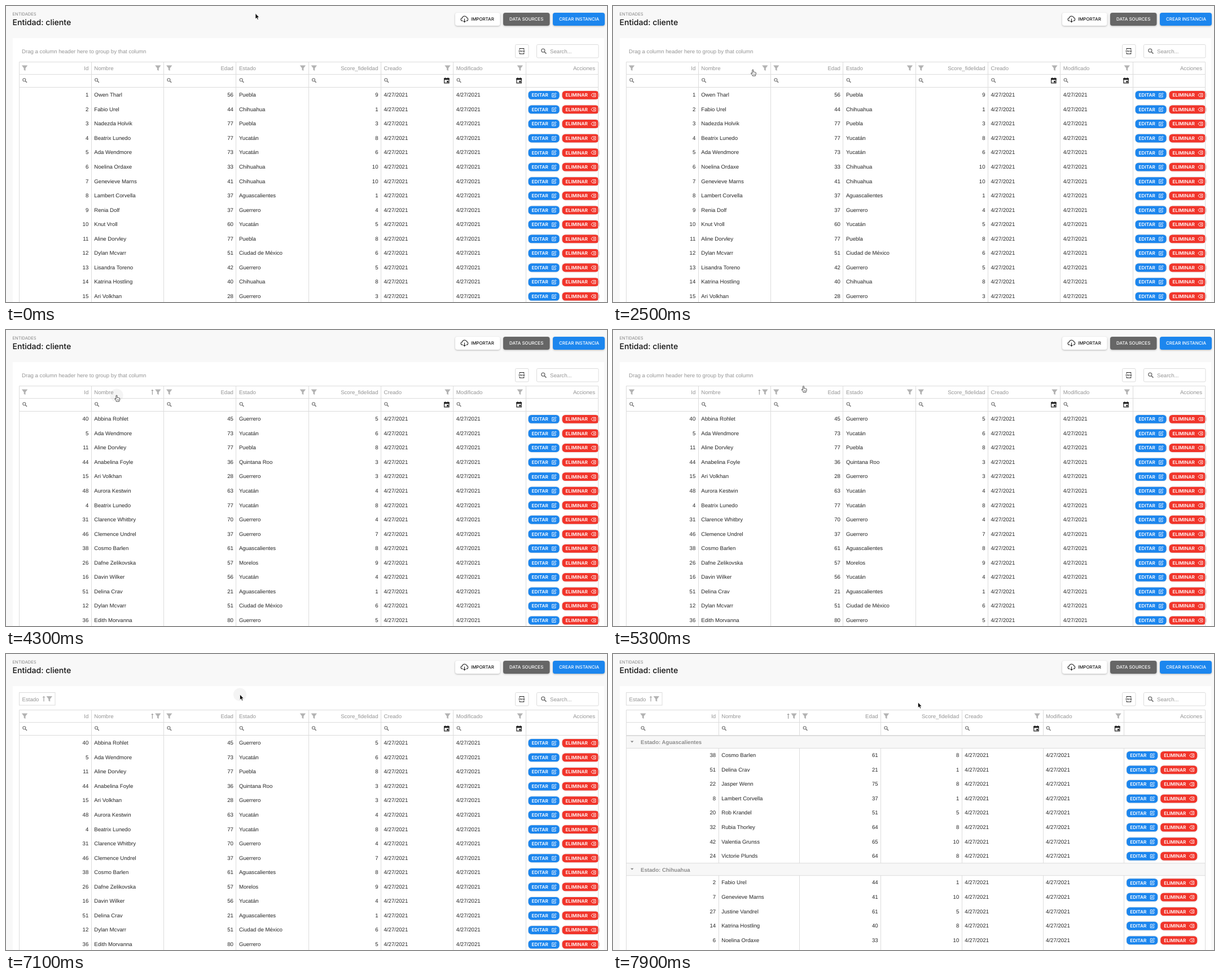
An HTML page that plays this animation: 1065 px wide and 526 px high, repeating every 8 s.

```html
<!DOCTYPE html>
<html lang="es">
<head>
<meta charset="utf-8">
<title>Entidad: cliente</title>
<style>
html, body { margin: 0; width: 100%; height: 100%; overflow: hidden; background: #f8f8f8; }
svg { display: block; width: 1065px; height: 526px; }
text { font: 9.65px "Liberation Sans", Arial, sans-serif; fill: #262626; text-rendering: geometricPrecision; white-space: pre; }
.r { text-anchor: end; }
.head { fill: #959595; }
.group { font-weight: bold; fill: #8d8d8d; }
.ui { font: 500 7.9px Inter, sans-serif; fill: #fff; }
.act { font: 600 8.2px Inter, sans-serif; fill: #fff; }
.line { stroke: #dcdcdc; fill: none; }
.box { stroke: #dcdcdc; fill: #fff; }
.lift { filter: drop-shadow(0 1px 1.5px #0004); }
.low { filter: drop-shadow(0 .7px .8px #0003); }
</style>
</head>
<body>
<svg id="stage" viewBox="0 0 1065 526"></svg>
<script>
const people = `1|Owen Tharl|56|Puebla|9
2|Fabio Urel|44|Chihuahua|1
3|Nadezda Holvik|77|Puebla|3
4|Beatrix Lunedo|77|Yucatán|8
5|Ada Wendmore|73|Yucatán|6
6|Noelina Ordaxe|33|Chihuahua|10
7|Genevieve Marns|41|Chihuahua|10
8|Lambert Corvella|37|Aguascalientes|1
9|Renia Dolf|37|Guerrero|4
10|Knut Vroll|60|Yucatán|5
11|Aline Dorvley|77|Puebla|8
12|Dylan Mcvarr|51|Ciudad de México|6
13|Lisandra Toreno|42|Guerrero|5
14|Katrina Hostling|40|Chihuahua|8
15|Ari Volkhan|28|Guerrero|3
16|Davin Wilker|56|Yucatán|4
20|Rob Krandel|51|Aguascalientes|5
22|Jasper Wenn|75|Aguascalientes|8
24|Victorie Plunds|64|Aguascalientes|8
26|Dafne Zelikovska|57|Morelos|9
27|Justine Vandrel|61|Chihuahua|5
31|Clarence Whitbry|70|Guerrero|4
32|Rubia Thorley|64|Aguascalientes|8
36|Edith Morvanna|80|Guerrero|5
38|Cosmo Barlen|61|Aguascalientes|8
40|Abbina Rohlet|45|Guerrero|5
42|Valentia Grunss|65|Aguascalientes|10
44|Anabelina Foyle|36|Quintana Roo|3
46|Clemence Undrel|37|Guerrero|7
48|Aurora Kestwin|63|Yucatán|4
51|Delina Crav|21|Aguascalientes|1`.split('\n').map(row => {
  const [Id, Nombre, Edad, Estado, Score_fidelidad] = row.split('|');
  return { Id, Nombre, Edad, Estado, Score_fidelidad, Creado: '4/27/2021', Modificado: '4/27/2021' };
});
const byName = [...people].sort((a, b) => a.Nombre < b.Nombre ? -1 : 1);
const numeric = ['Id', 'Edad', 'Score_fidelidad'];
const rowH = 25.55;

const text = (x, y, s, cls = '') => `<text x="${x}" y="${y}" class="${cls}">${s}</text>`;
const rect = (x, y, w, h, attrs) => `<rect x="${x}" y="${y}" width="${w}" height="${h}" ${attrs}/>`;
const icon = (id, x, y, attrs = '') => `<use href="#${id}" x="${x}" y="${y}" ${attrs}/>`;
const path = (d, attrs = 'class="line"') => `<path d="${d}" ${attrs}/>`;

function actions(x, y) {
  return `<g class="low">${rect(x, y - 7.3, 55, 14.8, 'rx="5.5" fill="#1c86ee"')}${rect(x + 60, y - 7.3, 65, 14.8, 'rx="5.5" fill="#f1352b"')}</g>`
    + text(x + 6, y + 3, 'EDITAR', 'act') + icon('edit', x + 45.5, y)
    + text(x + 66, y + 3, 'ELIMINAR', 'act') + icon('erase', x + 115.5, y);
}

// blocks: [{ title?, y, rows }], y is the top of the first data row
function grid(id, cols, left, pitch, blocks, sorted) {
  const edge = i => i ? 1049.4 - (cols.length + 1 - i) * pitch : left;
  let out = '';
  for (let i = 1; i <= cols.length; i++) out += path(`M${Math.floor(edge(i)) + .5} 99.5V526`);
  cols.forEach((name, i) => {
    const l = edge(i), r = edge(i + 1), num = numeric.includes(name);
    const place = (y, s, cls) => num ? text(r - 5, y, s, cls + ' r') : text(l + 5, y, s, cls);
    let col = place(114.4, name, 'head') + icon('funnel', num ? l + 9.6 : r - 10.3, 110.3);
    if (sorted && name == 'Nombre') col += icon('up', r - 20.3, 110.5);
    for (const b of blocks) b.rows.forEach((p, n) => col += place(b.y + 16.2 + n * rowH, p[name], ''));
    out += `<g class="col-${name}">${col}</g>` + icon('find', l + 9.8, 132.3);
    if (!num && /ado$/.test(name) && name != 'Estado') out += icon('date', r - 12, 132.5);
  });
  out += text(1044, 114.4, 'Acciones', 'head r');
  for (const b of blocks) {
    b.rows.forEach((p, n) => out += actions(edge(cols.length) + 4.5, b.y + 13.3 + n * rowH));
    if (b.title) out += rect(23.5, b.y - 21.5, 1026, 22, 'fill="#f7f7f7" stroke="#dcdcdc"')
      + text(49, b.y - 6.7, 'Estado: ' + b.title, 'group') + path(`M31 ${b.y - 12.5}h5.6l-2.8 3z`, 'fill="#888"');
  }
  return `<g id="${id}">${out}${path('M23.5 526V99.5H1049.5V526M23.5 121.5H1049.5M23.5 144.5H1049.5')}</g>`;
}

const cols = ['Id', 'Nombre', 'Edad', 'Estado', 'Score_fidelidad', 'Creado', 'Modificado'];
const inState = s => byName.filter(p => p.Estado == s);
const stage = document.getElementById('stage');

stage.innerHTML = `<defs>
  <path id="funnel" d="M-5.2-4.8H5.2L1.4.3V4.8L-1.4 3.4V.3Z" fill="#b3b3b3"/>
  <path id="up" d="M0 4.5V-4.2M-1.8-2.4L0-4.3L1.8-2.4" fill="none" stroke="#8c8c8c"/>
  <g id="find" fill="none" stroke="#6d6d6d" stroke-width="1.1"><circle cx="-1" cy="-1" r="2.5"/><path d="M.9.9L3.7 3.7" stroke-width="1.4"/></g>
  <g id="date"><path d="M-4.2-3.6H4.2V4.4H-4.2Z" fill="none" stroke="#222" stroke-width="1.2"/><path d="M-4.8-4.2H4.8V-1.3H-4.8ZM-3-5.3h1.3v2h-1.3zM1.7-5.3h1.3v2h-1.3zM.3.4h2.8v2.8h-2.8z" fill="#222"/></g>
  <path id="edit" d="M.2-2.9H-3.4V3.5H2.9V.2M-1.3 1.4L-1-.3L2.7-3.9L4-2.6L.3 1.1Z" fill="none" stroke="#fff" stroke-width=".9"/>
  <path id="erase" d="M-4.2 0L-1.7-2.9H3.8V2.9H-1.7ZM-.4-1.3L2.2 1.3M2.2-1.3L-.4 1.3" fill="none" stroke="#fff" stroke-width=".9"/>
</defs>
${rect(12, 57, 1048, 469, 'fill="#fff"')}
<text x="11.5" y="16.7" style="font:7.5px Inter,sans-serif;fill:#858585">ENTIDADES</text>
<text x="11.5" y="34.2" style="font:500 14.1px Inter,sans-serif;fill:#111">Entidad: cliente</text>
<g class="lift">${rect(796, 12, 79.5, 23, 'rx="4" fill="#fff"')}${rect(881, 12, 82.5, 23, 'rx="4" fill="#666"')}${rect(969, 12, 92, 23, 'rx="4" fill="#1c86ee"')}</g>
<text x="824" y="26.4" class="ui" style="fill:#111">IMPORTAR</text>
${text(892, 26.4, 'DATA SOURCES', 'ui')}${text(980, 26.4, 'CREAR INSTANCIA', 'ui')}
${path('M809.3 26.4h-.4a2.6 2.6 0 0 1-.3-5.2a4.1 4.1 0 0 1 7.8-.6a3 3 0 0 1 .2 5.8h-.7M812.5 22.5V28.6M810.4 26.7L812.5 28.8L814.6 26.7', 'fill="none" stroke="#222" stroke-width="1.1"')}
${rect(902.5, 68.5, 23.5, 23.5, 'rx="2" class="box"')}
${path('M910.3 77.5V75.5H917.7V77.5M910.3 83V85H917.7V83', 'fill="none" stroke="#222" stroke-width="1.1"')}
${path('M909.3 78.3V82.2M918.7 78.3V82.2M910.9 79l1.5 2.4M912.4 79l-1.5 2.4M913.7 79v2.3h1.1M917.2 79.2h-1.2v1h1.2v1.1h-1.2', 'fill="none" stroke="#222" stroke-width=".8"')}
${rect(940.5, 68.5, 109.5, 23.5, 'rx="2" class="box"')}
<use href="#find" transform="translate(953 80.3) scale(1.2)"/>
${text(964, 83.8, 'Search...', 'head')}
<g id="hint">${text(28, 83.8, 'Drag a column header here to group by that column', 'head')}</g>
<g id="chip">${rect(23.5, 68.5, 63.5, 22.5, 'class="box"')}${text(28.5, 83.8, 'Estado', 'head')}${icon('up', 67, 79.8)}${icon('funnel', 76.8, 79.8)}</g>
${grid('plain', cols, 23.5, 128.3, [{ y: 145, rows: people.slice(0, 15) }])}
${grid('sorted', cols, 23.5, 128.3, [{ y: 145, rows: byName.slice(0, 15) }], true)}
${grid('grouped', cols.filter(c => c != 'Estado'), 43.7, 143.7, [
  { title: 'Aguascalientes', y: 167, rows: inState('Aguascalientes') },
  { title: 'Chihuahua', y: 393.2, rows: inState('Chihuahua') }], true)}
<g id="ghost">${rect(-35.5, -2.5, 128, 22, 'fill="#fff" stroke="#93abc2"')}${text(-30.5, 12.8, 'Estado', 'head')}</g>
<circle id="press" r="11.6" fill="#808080"/>
<path id="arrow" d="M0 0V9.6L2.2 7.6L3.7 11L5.3 10.3L3.8 7H6.7Z" stroke="#fff" stroke-width=".7"/>
<g id="hand" stroke="#222" stroke-width=".8"><path d="M-1 1a1 1 0 0 1 2 0V4.5Q1.6 3.6 2.5 4.4Q3.4 3.8 4.1 4.8Q5.6 4.5 5.6 6V7.8Q5.4 9 4.6 9.6V11H-.6V10Q-1.8 8.6-3.2 6.6Q-3.2 5.4-1.9 6L-1 6.9Z" fill="#fff"/><path d="M.9 7.2V9.2M2.3 7.2V9.2M3.7 7.2V9.2" stroke-width=".5"/></g>`;

const $ = id => document.getElementById(id);
const show = (id, on) => $(id).style.display = on ? '' : 'none';
const estado = document.querySelector('#sorted .col-Estado');

// pointer stops: time, x, y
const stops = [
  [0, 442, 13.3], [800, 442, 13.3], [1100, 442, 2.5], [1400, 442, 13.3],
  [1500, 405.5, 25], [1600, 352, 52], [1700, 312, 73], [1800, 312, 73],
  [2200, 268, 106], [2600, 241, 115.5], [3300, 241, 115.5], [3500, 196, 116], [4700, 196, 116],
  [5300, 337.5, 99.5], [5500, 375, 102], [5600, 375, 102], [6200, 443, 106], [6400, 443, 106],
  [6600, 419, 74], [6900, 414.5, 72], [7500, 414.5, 72],
  [7600, 428, 67.5], [7700, 470, 69], [7800, 515, 79], [7900, 540.5, 86]];
const presses = [[3900, 4100], [6200, 6900]];

function pointer(t) {
  const i = stops.findIndex(s => s[0] >= t);
  if (i < 1) return stops[0].slice(1);
  const [t0, x0, y0] = stops[i - 1], [t1, x1, y1] = stops[i];
  const k = (t - t0) / (t1 - t0);
  return [x0 + (x1 - x0) * k, y0 + (y1 - y0) * k];
}

function draw(now) {
  const t = Math.floor(now % 8000 / 100) * 100;
  const [x, y] = pointer(t);
  const dragging = t >= 6500 && t < 7000;
  const hand = dragging || y >= 99;
  let glow = 0;
  for (const [down, up] of presses)
    if (t >= down) glow = Math.max(0, Math.min(1, 1 - (t - up) / 300)) ** 2;

  show('plain', t < 4200);
  show('sorted', t >= 4200 && t < 7200);
  show('grouped', t >= 7200);
  show('hint', t < 7000);
  show('chip', t >= 7000);
  show('ghost', dragging);
  show('hand', hand);
  show('arrow', !hand);
  estado.style.opacity = dragging ? .5 : 1;
  $('press').style.opacity = .8 * glow;
  for (const id of ['ghost', 'press', 'arrow', 'hand']) $(id).setAttribute('transform', `translate(${x} ${y})`);
  requestAnimationFrame(draw);
}
requestAnimationFrame(draw);
</script>
</body>
</html>
```
